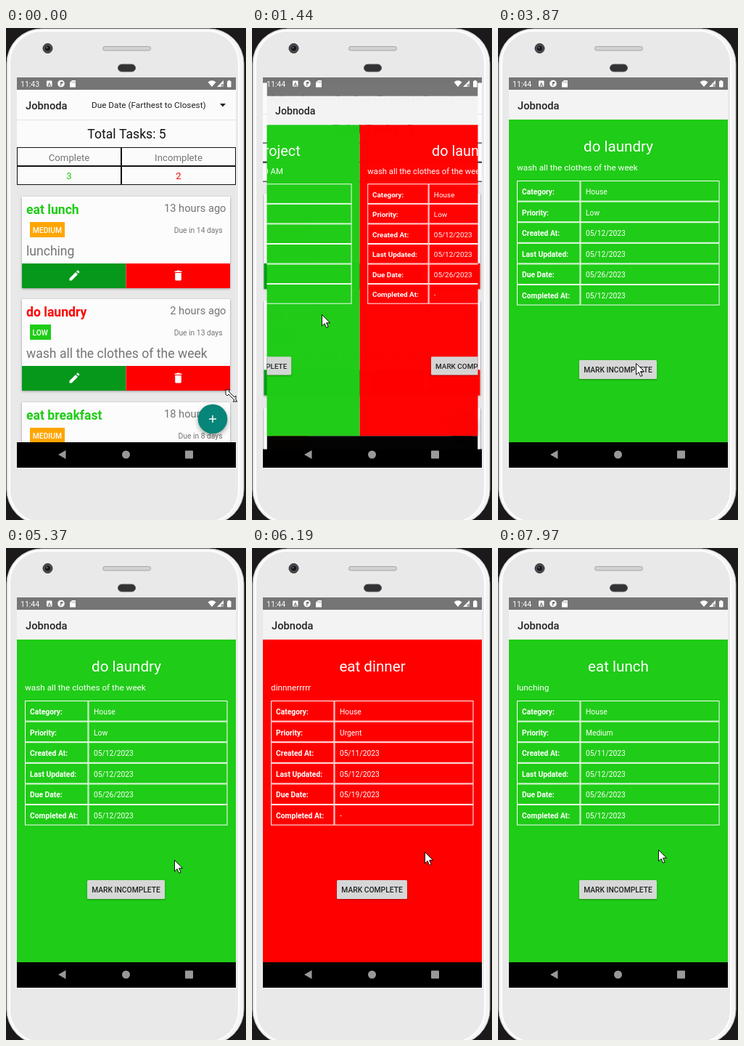
An HTML page with a canvas that plays this animation: 331x677 px, repeating every 8000 ms.

```html
<!DOCTYPE html>
<html lang="en">
<head>
<meta charset="utf-8">
<title>Task list</title>
<style>
html, body { margin: 0; width: 100%; height: 100%; overflow: hidden; background: #1b1919; }
canvas { display: block; }
</style>
</head>
<body>
<canvas id="stage" width="331" height="677"></canvas>
<script>
const ctx = document.getElementById('stage').getContext('2d');
const LOOP = 8000;
const GREEN = '#1fcc17', RED = '#ff0000', GREY = '#757575';
const SCREEN = { x: 15, y: 68, w: 302, h: 537 };
const OPEN_AT = 1340, COMPLETE_AT = 3250;

const easeOut = u => 1 - (1 - u) ** 2;
const clamp = (v, lo = 0, hi = 1) => Math.min(hi, Math.max(lo, v));

// Keys: [time, values, ease into this key]
function track(keys, t) {
  let prev = keys[0];
  for (const key of keys) {
    if (t < key[0]) {
      if (key === prev) return key[1];
      const u = (key[2] || (v => v))((t - prev[0]) / (key[0] - prev[0]));
      return prev[1].map((v, i) => v + (key[1][i] - v) * u);
    }
    prev = key;
  }
  return prev[1];
}

const cursorKeys = [
  [50, [311, 506]], [830, [96, 394], easeOut], [1500, [96, 394]],
  [2110, [274, 429], easeOut], [2470, [274, 429]], [2790, [174, 465], easeOut],
  [3810, [174, 465]], [4140, [222, 452], easeOut],
  [4760, [222, 452]], [5120, [233, 429], easeOut],
  [5370, [233, 429]], [5610, [48, 416]], [5670, [13, 414]], [5760, [13, 414]],
  [6070, [238, 418], easeOut],
  [6690, [238, 418]], [6930, [51, 410]], [6990, [17, 409]], [7090, [17, 409]],
  [7450, [209, 415], easeOut], [7910, [209, 415]], [7970, [221, 415]]
];
const pageKeys = [
  [OPEN_AT, [0]], [1640, [1], easeOut],
  [5400, [1]], [5610, [1.546]], [5670, [1.66]], [5960, [2], easeOut],
  [6720, [2]], [6930, [2.546]], [6990, [2.66]], [7280, [3], easeOut]
];

const cards = [
  { title: 'eat lunch', done: true, age: '13 hours ago', level: 'MEDIUM', due: '14', note: 'lunching' },
  { title: 'do laundry', done: false, age: '2 hours ago', level: 'LOW', due: '13', note: 'wash all the clothes of the week' },
  { title: 'eat breakfast', done: true, age: '18 hours ago', level: 'MEDIUM', due: '8', note: '' }
];
const labels = ['Category:', 'Priority:', 'Created At:', 'Last Updated:', 'Due Date:', 'Completed At:'];
const day = d => `05/${d}/2023`;
const pages = [
  { title: 'submit project', note: 'the second meeting is at 10:00 AM', values: ['School', 'High', day(11), day(12), day(19), day(12)] },
  { title: 'do laundry', note: 'wash all the clothes of the week', values: ['House', 'Low', day(12), day(12), day(26), '-'] },
  { title: 'eat dinner', note: 'dinnnerrrrr', values: ['House', 'Urgent', day(11), day(12), day(19), '-'] },
  { title: 'eat lunch', note: 'lunching', values: ['House', 'Medium', day(11), day(12), day(26), day(12)] }
];

function rect(x, y, w, h, color) {
  ctx.fillStyle = color;
  ctx.fillRect(x, y, w, h);
}
function round(x, y, w, h, r, fill, stroke, line = 1) {
  ctx.beginPath();
  ctx.roundRect(x, y, w, h, r);
  paint(fill, stroke, line);
}
function circle(x, y, r, fill, stroke, line = 1) {
  ctx.beginPath();
  ctx.arc(x, y, r, 0, 7);
  paint(fill, stroke, line);
}
function shape(path, fill, stroke, line = 1) {
  const p = new Path2D(path);
  if (fill) { ctx.fillStyle = fill; ctx.fill(p); }
  if (stroke) { ctx.strokeStyle = stroke; ctx.lineWidth = line; ctx.stroke(p); }
}
function paint(fill, stroke, line) {
  if (fill) { ctx.fillStyle = fill; ctx.fill(); }
  if (stroke) { ctx.strokeStyle = stroke; ctx.lineWidth = line; ctx.stroke(); }
}
// Table cell with its border inside, so that neighbours form a double line
function cell(x, y, w, h, color) {
  ctx.strokeStyle = color;
  ctx.lineWidth = 1;
  ctx.strokeRect(x + .5, y + .5, w - 1, h - 1);
}
function text(str, x, y, size, color, align = 'left', weight = 400) {
  ctx.font = `${weight} ${size}px Roboto, sans-serif`;
  ctx.textAlign = align;
  ctx.fillStyle = color;
  ctx.fillText(str, x, y);
}
function at(x, y, draw) {
  ctx.save();
  ctx.translate(x, y);
  draw();
  ctx.restore();
}
function shadow(blur, dy, draw) {
  ctx.save();
  ctx.shadowColor = 'rgba(0,0,0,.35)';
  ctx.shadowBlur = blur;
  ctx.shadowOffsetY = dy;
  draw();
  ctx.restore();
}

function drawPhone() {
  rect(0, 0, 331, 677, '#1b1919');
  round(1, 1, 327, 682, 48, '#f5f4f4', '#bdbcbc');
  round(5, 4, 316, 676, 44, '#e9e9e9', '#fdfdfd', 2);
  circle(57.5, 28, 6.5, '#4b4b4d', '#2b2b2d');
  circle(57.5, 28, 3.5, '#15171d');
  circle(56.5, 27, 1.2, '#55617a');
  round(133.5, 25.5, 66, 5.5, 2.7, '#d2d2d2', '#a5a5a5');
  round(154.5, 50, 24, 10, 5, '#333234', '#555');
}

function drawStatus(clock) {
  text(clock, 20, 81, 10.5, '#fff');
  round(56, 72.5, 7.5, 8, 1, '#fff');
  text('A', 59.8, 79.5, 7, GREY, 'center', 700);
  circle(76, 76.5, 4.8, '#fff');
  rect(75, 74, 3.5, 2.5, GREY);
  rect(75, 76, 1.3, 3.5, GREY);
  shape('M88 75l3-3h5v9.5h-8z', '#fff');
  shape('M91 73.5v2M93 73.5v2M94.7 73.5v2', null, GREY, .7);
  shape('M278.5 74.5Q284 70 289.5 74.5L284 81z', '#fff');
  shape('M300 72v9h-9z', '#fff');
  rect(296.5, 77, 3.5, 4, '#aaa');
  round(305, 73, 5.5, 8.5, .8, '#fff');
  rect(306.5, 72, 2.5, 2, '#fff');
}

function drawCard(card, y) {
  const color = card.done ? GREEN : RED;
  const low = card.level === 'LOW';
  shadow(3, 1, () => rect(22, y, 287, 126, '#fcfcfc'));
  text(card.title, 28, y + 24, 17.6, color, 'left', 700);
  text(card.age, 303.5, y + 21, 14.7, GREY, 'right');
  rect(33, y + 35, low ? 29 : 48, 21, low ? GREEN : '#ffa500');
  text(card.level, low ? 36.5 : 36.8, y + 49.5, 10.3, '#fff', 'left', 500);
  text(`Due in ${card.due} days`, 298.5, y + 49.5, 10.3, GREY, 'right');
  text(card.note, 28, y + 81, 17.6, GREY);
  rect(22, y + 92, 143.5, 34, '#05981b');
  rect(165.5, y + 92, 143.5, 34, RED);
  at(94, y + 109, () => shape('M-6.5 6.5v-3L2-5l3 3-8.5 8.5zM3-6l1.3-1.3q.7-.5 1.3 0l1.5 1.5q.6.7 0 1.3L5.8-3.2z', '#fff'));
  at(237.5, y + 109, () => shape('M-5-6.5h2.5l1-1h3l1 1H5v1.5H-5zM-4.3-4h8.6v9q0 1.5-1.5 1.5h-5.6q-1.5 0-1.5-1.5z', '#fff'));
}

function drawCount(x, label, count, color) {
  cell(x, 164, 151 - 7.5 * Math.sign(x - 16) * -1 - 0, 26, '#111');
  text(label, x + 71.5, 182.5, 13.2, GREY, 'center');
  text(count, x + 71.5, 208, 13.2, color, 'center');
}

function drawList() {
  rect(15, 68, 302, 17, GREY);
  rect(15, 85, 302, 485, '#e8e8e8');
  rect(15, 85, 302, 131, '#fbfbfb');
  rect(15, 126, 302, 1, '#e3e3e3');
  text('Jobnoda', 27, 111.5, 14.7, '#222', 'left', 500);
  text('Due Date (Farthest to Closest)', 118, 110, 11.75, '#222');
  shape('M295 104h8l-4 4.5z', '#222');
  text('Total Tasks: 5', 166.5, 152, 17.6, '#111', 'center');
  [[15, 144, 'Complete', '3', GREEN], [159, 158, 'Incomplete', '2', RED]].forEach(([x, w, label, count, color]) => {
    cell(x, 164, w, 26, '#111');
    cell(x, 190, w, 26, '#111');
    text(label, x + w / 2, 182.5, 13.2, GREY, 'center');
    text(count, x + w / 2, 208, 13.2, color, 'center');
  });
  ctx.save();
  ctx.beginPath();
  ctx.rect(15, 216, 302, 354);
  ctx.clip();
  cards.forEach((card, i) => drawCard(card, Math.round(232 + i * 141.4)));
  shadow(6, 3, () => circle(285, 538, 20.3, '#068578'));
  shape('M280 538h10M285 533v10', null, '#fff', 1.5);
  ctx.restore();
}

function drawPage(page, x, done, completed, press) {
  at(x, 0, () => {
    rect(15, 126, 302, 444, done ? GREEN : RED);
    text(page.title, 166, 170, 20.6, '#fff', 'center');
    text(page.note, 26, 196, 11.75, '#fff');
    labels.forEach((label, i) => {
      const y = 210 + i * 28.6;
      cell(26, y, 87.5, 28.6, '#fff');
      cell(113.5, y, 192, 28.6, '#fff');
      text(label, 33, y + 19, 10.3, '#fff', 'left', 700);
      text(i === 5 && completed ? completed : page.values[i], 121, y + 19, 10.3, '#fff');
    });
    const w = done ? 107 : 97;
    shadow(2, 1, () => round(165.5 - w / 2, 457, w, 26, 1.5, '#d6d7d7'));
    if (press > 0) round(165.5 - w / 2, 457, w, 26, 1.5, `rgba(0,0,0,${.15 * press})`);
    text(done ? 'MARK INCOMPLETE' : 'MARK COMPLETE', 165.5, 474, 10.3, '#222', 'center', 500);
  });
}

function drawDetail(t) {
  const position = track(pageKeys, t)[0];
  const laundryDone = t >= COMPLETE_AT;
  ctx.beginPath();
  ctx.rect(15, 50, 302, 555);
  ctx.clip();
  rect(15, 50, 302, 35, GREY);
  rect(15, 85, 302, 41, '#f3f3f3');
  rect(15, 570, 302, 35, '#000');
  text('Jobnoda', 27, 111.5, 14.7, '#222', 'left', 500);
  const press = t < 3070 ? 0 : clamp((t - 3070) / 100) * clamp((3600 - t) / 250);
  pages.forEach((page, i) => {
    const x = Math.round((i - position) * SCREEN.w);
    if (Math.abs(x) >= SCREEN.w) return;
    const isLaundry = i === 1;
    const done = isLaundry ? laundryDone : page.values[5] !== '-';
    drawPage(page, x, done, isLaundry && laundryDone && day(12), isLaundry ? press : 0);
  });
}

function scaled(scale, alpha, draw) {
  ctx.save();
  ctx.globalAlpha = alpha;
  ctx.translate(166, 328);
  ctx.scale(scale, scale);
  ctx.translate(-166, -328);
  draw();
  ctx.restore();
}

function drawScreen(t) {
  const opened = 1 - (1 - clamp((t - OPEN_AT) / 400)) ** 2.5;
  ctx.save();
  ctx.beginPath();
  ctx.rect(SCREEN.x, SCREEN.y, SCREEN.w, SCREEN.h);
  ctx.clip();
  rect(SCREEN.x, SCREEN.y, SCREEN.w, SCREEN.h, '#000');
  if (opened < 1) scaled(1 + .075 * opened, 1, drawList);
  if (opened > 0) scaled(.925 + .075 * opened, clamp(opened * 1.91), () => drawDetail(t));
  drawStatus(t < 500 ? '11:43' : '11:44');
  shape('M72 587l10.5-6v12z', '#999');
  circle(165.5, 587, 5.5, '#999');
  round(247, 581.5, 11, 11, 1, '#999');
  ctx.restore();
}

function drawCursor(t) {
  const [x, y] = track(cursorKeys, t).map(Math.round);
  at(x, y, () => {
    if (t < 60) {
      shape('M-8-8h6l-2 2L4 2l2-2v6l2 2H2l2-2-8-8-2 2-2-2z', '#fff', '#111');
    } else {
      shape('M.5.5V16l3.6-3.4 2.5 5.8 2.5-1.1-2.5-5.6h5z', '#fff', '#111');
    }
  });
}

function frame(now) {
  const t = now % LOOP;
  drawPhone();
  drawScreen(t);
  drawCursor(t);
  requestAnimationFrame(frame);
}
frame(0);
</script>
</body>
</html>
```
